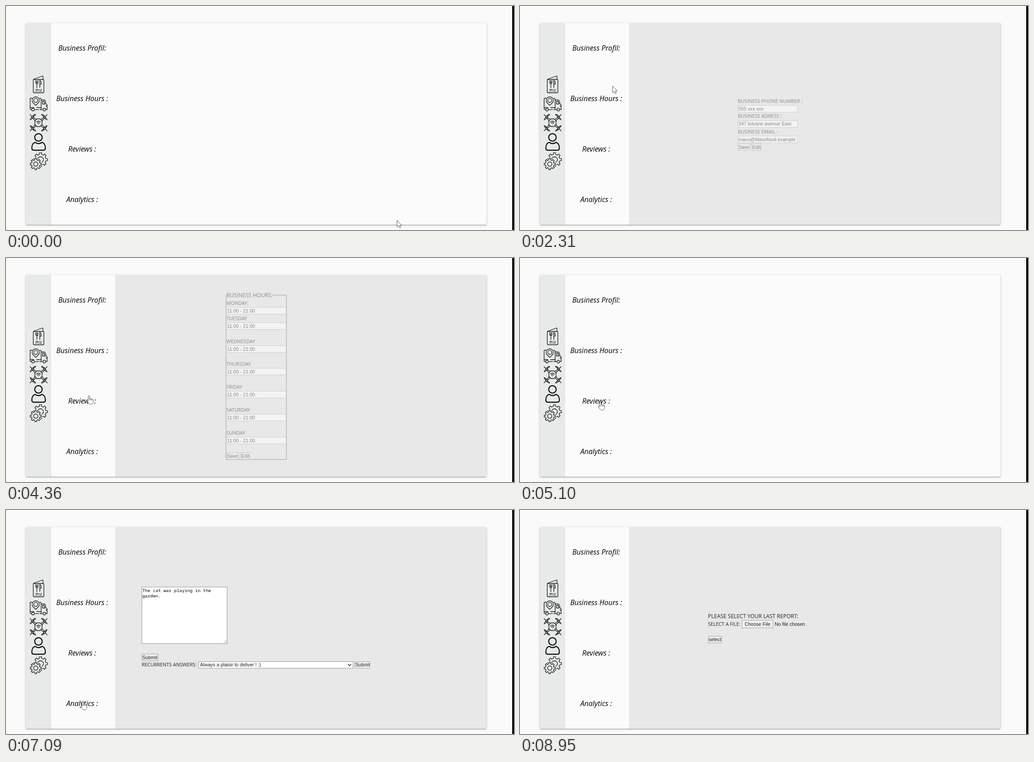
Animation, 1127 px wide and 497 px high, one loop 9590 ms. Source, as an HTML page:

```html
<!DOCTYPE html>
<html lang="en">
<head>
<meta charset="utf-8">
<title>Business dashboard</title>
<style>
  html, body { margin: 0; width: 100%; height: 100%; overflow: hidden; background: #fafafa; }
  .card {
    position: absolute; left: 44px; top: 38px; width: 1022px; height: 447px;
    border-radius: 2px; background: #fbfbfb;
    box-shadow: 0 2px 1px -2px rgba(0,0,0,.2), 0 2px 2px rgba(0,0,0,.14), 0 1px 5px rgba(0,0,0,.2);
  }
  svg { position: absolute; left: 0; top: 0; display: block; }
  text { white-space: pre; }
  .nav { font: italic 16px "Open Sans", sans-serif; text-anchor: middle; fill: #000; }
  .label { font: 10.8px "Open Sans", sans-serif; fill: #222; }
  .title { font: 12px "Open Sans", sans-serif; fill: #222; }
  .ui { font: 10.67px "Liberation Sans", Arial, sans-serif; fill: #1c1c1c; }
  .mono { font: 9.78px "Noto Sans Mono", monospace; fill: #000; }
  .field { fill: #fff; stroke: #aaa; stroke-width: .9; }
  .button { fill: #efefef; stroke: #999; stroke-width: .9; }
  .icons { fill: none; stroke: #111; stroke-width: 1.3; stroke-linecap: round; stroke-linejoin: round; }
  .solid { fill: #e8eaea; }

  .panel, .view, .cursor, .hand, .arrow { animation: 9590ms linear infinite; }
  .panel { fill: #e8e8e8; transform-origin: 242px 38px; animation-name: grow; }
  .profile { animation-name: profile; }
  .hours { animation-name: hours; }
  .reviews { animation-name: reviews; }
  .analytics { animation-name: analytics; }
  .cursor { animation-name: move; }
  .hand { animation-name: hand; animation-timing-function: step-end; }
  .arrow { animation-name: arrow; animation-timing-function: step-end; }
  .cursor path { fill: #fff; stroke: #444; stroke-width: .9; stroke-linejoin: round; }

  @keyframes grow {
    0%, 17.6% { transform: scale(0); animation-timing-function: ease-in-out; }
    19.81% { transform: scale(1); animation-timing-function: step-end; }
    34.72% { transform: scale(0); animation-timing-function: step-end; }
    36.39% { transform: scale(0); animation-timing-function: ease-in-out; }
    39.52% { transform: scale(1); animation-timing-function: step-end; }
    53.18% { transform: scale(0); animation-timing-function: step-end; }
    54.85% { transform: scale(0); animation-timing-function: ease-in-out; }
    57.98% { transform: scale(1); animation-timing-function: step-end; }
    74.66% { transform: scale(0); animation-timing-function: step-end; }
    76.2% { transform: scale(0); animation-timing-function: ease-in-out; }
    79.4%, 100% { transform: scale(1); }
  }
  @keyframes profile {
    0%, 18.87% { opacity: 0; }
    29.82% { opacity: 1; animation-timing-function: step-end; }
    34.72%, 100% { opacity: 0; }
  }
  @keyframes hours {
    0%, 40.35% { opacity: 0; }
    50.99% { opacity: 1; animation-timing-function: step-end; }
    53.18%, 100% { opacity: 0; }
  }
  @keyframes reviews {
    0%, 59.1% { opacity: 0; }
    69.66% { opacity: 1; animation-timing-function: step-end; }
    74.66%, 100% { opacity: 0; }
  }
  @keyframes analytics {
    0%, 80.1% { opacity: 0; }
    89.68%, 100% { opacity: 1; }
  }
  @keyframes move {
    0%, .5% { transform: translate(867px, 475px); animation-timing-function: ease-in-out; }
    10.22%, 11.16% { transform: translate(179px, 97px); }
    12.72% { transform: translate(178px, 87px); }
    13.66% { transform: translate(175px, 87px); }
    15.12% { transform: translate(179px, 97px); }
    17.52% { transform: translate(186px, 117px); }
    19.4% { transform: translate(192px, 136px); }
    24.09%, 24.8% { transform: translate(205px, 177px); }
    28.15%, 33.6% { transform: translate(203px, 193px); }
    34.72% { transform: translate(198px, 196px); animation-timing-function: ease-in-out; }
    45.3%, 52.2% { transform: translate(184px, 305px); }
    53.18% { transform: translate(178px, 318px); }
    55.68% { transform: translate(176px, 340px); }
    59.02%, 59.6% { transform: translate(177px, 359px); }
    65.28%, 71.8% { transform: translate(169px, 424px); }
    72.99% { transform: translate(165px, 424px); }
    73.7%, 79.7% { transform: translate(170px, 424px); animation-timing-function: ease-in-out; }
    89.26% { transform: translate(948px, 484px); }
    90.09% { transform: translate(953px, 487px); }
    91.14% { transform: translate(973px, 488px); }
    92.7% { transform: translate(1003px, 492px); }
    93.3%, 100% { transform: translate(1010px, 520px); }
  }
  @keyframes hand {
    0% { opacity: 0; } 11% { opacity: 1; } 18.98% { opacity: 0; }
    27.5% { opacity: 1; } 37.7% { opacity: 0; }
    44.3% { opacity: 1; } 54.7% { opacity: 0; }
    63.6% { opacity: 1; } 80.4%, 100% { opacity: 0; }
  }
  @keyframes arrow {
    0% { opacity: 1; } 11% { opacity: 0; } 18.98% { opacity: 1; }
    27.5% { opacity: 0; } 37.7% { opacity: 1; }
    44.3% { opacity: 0; } 54.7% { opacity: 1; }
    63.6% { opacity: 0; } 80.4%, 100% { opacity: 1; }
  }
</style>
</head>
<body>
<div class="card"></div>
<svg width="1127" height="497" viewBox="0 0 1127 497">
  <rect x="1123" width="4" height="497"/>
  <rect x="44" y="38" width="56" height="447" fill="#e8eaea"/>
  <rect x="99" y="38" width="1" height="447" fill="#dfe1e1"/>

  <g class="icons">
    <!-- menu -->
    <rect x="60.5" y="163" width="23.5" height="29.5" rx="2"/>
    <path d="M61 162.5L80.5 155.5q1.7-.4 1.7 1.3V162.5M66 165.500v4q0 2.500 2.500 2.500t2.500-2.500v-4M68.500 165.500V181M75 181V165q3.300 2 3.300 6.500l-.6 2H75"/>
    <path d="M66 185.500h6M74.500 185.500h.5M77.500 185.500h1.500M66 188.700h2M70.500 188.700h1M74 188.700h4.500"/>
    <!-- delivery truck -->
    <path d="M58 204.500h-2.500q-2 0-2 2v21q0 2.300 2 2.300h1M64.500 229.800H72M74.500 229.800h6.500M74.500 205q3.500-.5 3.500 2.500v22M53.500 225.500H62M68 225.500h10M78.500 208.500h6q1.500 0 2.200 1.500l2.300 7.500 2.300 2v10h-2M81 211.500h3.500l2 6H81zM91 222h-2.500"/>
    <path d="M66 220.500l-5.500-5.200a8 8 0 1 1 11 0z"/>
    <circle cx="66" cy="209.300" r="4.500"/>
    <circle cx="60" cy="229.800" r="3"/><circle cx="85" cy="229.800" r="3"/>
    <!-- drone -->
    <path d="M68 250.500h8q2 4 4.500 4.500-1.500 4 0 8-2.500 .5-4.500 4.500h-8q-2-4-4.500-4.500 1.500-4 0-8 2.500-.5 4.500-4.500z"/>
    <path d="M67.500 257.500q4.500-4 9 0M69.500 260q2.500-2 5 0M72 262.500h.1"/>
    <g id="arms"></g>
    <!-- user -->
    <g stroke-width="2.400">
      <circle cx="72" cy="291.500" r="8.300"/>
      <path d="M64.500 302.500C59.500 304.500 57.300 309 57.300 315q0 5 4.500 5h21q4.500 0 4.500-5c0-6-2.200-10.500-7.200-12.500q-7.600 5.500-15.600 0z"/>
    </g>
    <!-- settings -->
    <path id="gearBack"/><circle cx="76.500" cy="341" r="6.500"/>
    <path id="gearHalo" class="solid" stroke="#e8eaea" stroke-width="4"/>
    <path id="gearFront" class="solid"/><circle cx="66" cy="350.800" r="4.800"/>
  </g>

  <g class="nav">
    <text x="169" y="99">Business Profil:</text>
    <text x="169" y="211">Business Hours :</text>
    <text x="169" y="323">Reviews :</text>
    <text x="169" y="435">Analytics :</text>
  </g>

  <rect class="panel" x="242" y="38" width="824" height="447"/>

  <g class="view profile">
    <text class="label" x="483" y="215">BUSINESS PHONE NUMBER :</text>
    <rect class="field" x="483.500" y="220.500" width="132" height="15"/>
    <text class="ui" x="484.500" y="232">555 xxx xxx</text>
    <text class="label" x="483" y="248">BUSINESS ADRESS :</text>
    <rect class="field" x="483.500" y="254.500" width="132" height="15"/>
    <text class="ui" x="484.500" y="265">347 tolvane avenue East</text>
    <text class="label" x="483" y="283">BUSINESS EMAIL :</text>
    <rect class="field" x="483.500" y="288.500" width="132" height="15"/>
    <text class="ui" x="484.500" y="300">mavo@Mavofood.example</text>
    <rect class="button" x="483.500" y="305.500" width="27" height="15"/>
    <text class="ui" x="484.500" y="317">Save</text>
    <rect class="button" x="514" y="305.500" width="21" height="15"/>
    <text class="ui" x="515.500" y="317">Edit</text>
  </g>

  <g class="view hours">
    <path d="M489 82.500H488V447H622.300V82.500H591" fill="none" stroke="#808080" stroke-width="1.400"/>
    <text class="title" x="489" y="87">BUSINESS HOURS:</text>
    <g id="days"></g>
    <rect class="button" x="489.500" y="431.500" width="27" height="15"/>
    <text class="ui" x="490.500" y="443">Save</text>
    <rect class="button" x="520" y="431.500" width="21" height="15"/>
    <text class="ui" x="521.500" y="443">Edit</text>
  </g>

  <g class="view reviews">
    <rect class="field" x="301.500" y="171" width="189" height="125.500" style="stroke:#888"/>
    <text class="mono" x="302.500" y="182">The cat was playing in the</text>
    <text class="mono" x="302.500" y="194">garden.</text>
    <path d="M483 295l6.500-6.500M487 295l2.500-2.500" stroke="#777" stroke-width=".8"/>
    <rect class="button" x="301.500" y="319.500" width="36" height="15"/>
    <text class="ui" x="302.500" y="331">Submit</text>
    <text class="label" x="301" y="347">RECURRENTS ANSWERS:</text>
    <rect class="field" x="427" y="336.500" width="343" height="14.500" style="stroke:#888"/>
    <text class="ui" x="430.500" y="347">Always a plaisir to deliver ! :)</text>
    <path d="M758.500 341.800l3.700 3.700 3.700-3.700" fill="none" stroke="#222" stroke-width="1.400"/>
    <rect x="773.500" y="336.500" width="36" height="14.500" fill="#efefef"/>
    <path d="M809.500 336.500H773.500V351H809.500" fill="none" stroke="#999" stroke-width=".9"/>
    <text class="ui" x="775" y="347">Submit</text>
  </g>

  <g class="view analytics">
    <text class="title" x="417" y="240">PLEASE SELECT YOUR LAST REPORT:</text>
    <text class="label" x="417" y="257">SELECT A FILE:</text>
    <rect class="button" x="492.500" y="244.500" width="69" height="17"/>
    <text class="ui" x="498.500" y="257">Choose File</text>
    <text class="ui" x="565" y="257">No file chosen</text>
    <rect class="button" x="417.500" y="280" width="30" height="15"/>
    <text class="ui" x="418.500" y="291">select</text>
  </g>

  <g class="cursor">
    <path class="arrow" d="M.5 .5V15.500L4 12.300 6.400 17.500 8.700 16.500 6.400 11.500H10.800z"/>
    <path class="hand" transform="translate(-5 0)" d="M3.500 12V2a1.600 1.600 0 0 1 3.200 0V8a1.400 1.400 0 0 1 2.800 .2 1.400 1.400 0 0 1 2.700 .6 1.300 1.300 0 0 1 2.400 .8V13.500c0 3-1.600 6-4.600 6H8.200c-2.400 0-3.400-1.600-4.600-3.600L.8 11.600c-.6-1.400 1.200-2.200 2-1.200zM6.700 8v3M9.500 8.500v2.500M12.200 9v2.500"/>
  </g>
</svg>
<script>
  const el = id => document.getElementById(id);

  // Closed outline with square teeth around a centre
  function gear(cx, cy, outer, inner, teeth) {
    const step = 2 * Math.PI / teeth, points = [];
    for (let i = 0; i < teeth; i++) {
      for (const [turn, r] of [[-.27, inner], [-.2, outer], [.2, outer], [.27, inner]]) {
        const a = (i + turn) * step;
        points.push((cx + r * Math.cos(a)).toFixed(2) + " " + (cy + r * Math.sin(a)).toFixed(2));
      }
    }
    return "M" + points.join("L") + "Z";
  }
  el("gearBack").setAttribute("d", gear(76.5, 341, 15.5, 12, 8));
  for (const id of ["gearHalo", "gearFront"]) {
    el(id).setAttribute("d", gear(66, 350.8, 12.5, 9.5, 8));
  }

  // One arm and rotor, mirrored to the four corners
  el("arms").innerHTML = [[1, 1], [-1, 1], [1, -1], [-1, -1]].map(([sx, sy]) =>
    `<g transform="translate(72.3 259) scale(${sx} ${sy})">
      <path d="M6 7.500L11 12M8 5L13 10"/><circle cx="13.300" cy="12.500" r="2"/>
      <path d="M12 14.500Q8 15 6.500 18.500 10.500 18.500 12.800 15zM15.200 11.500Q18 9.500 18.800 6.500 14.500 7.500 14 10.500zM15 14l4 4"/>
    </g>`).join("");

  const days = ["MONDAY:", "TUESDAY", "WEDNESDAY", "THURSDAY", "FRIDAY", "SATURDAY", "SUNDAY"];
  el("days").innerHTML = days.map((day, i) => {
    const y = i ? Math.round(137.8 + (i - 1) * 50.8) : 104;
    return `<text class="label" x="489" y="${y}">${day}</text>
      <rect class="field" x="489" y="${y + 5.5}" width="132.500" height="15"/>
      <text class="ui" x="490.500" y="${y + 17}">11:00 - 21:00</text>`;
  }).join("");
</script>
</body>
</html>
```
